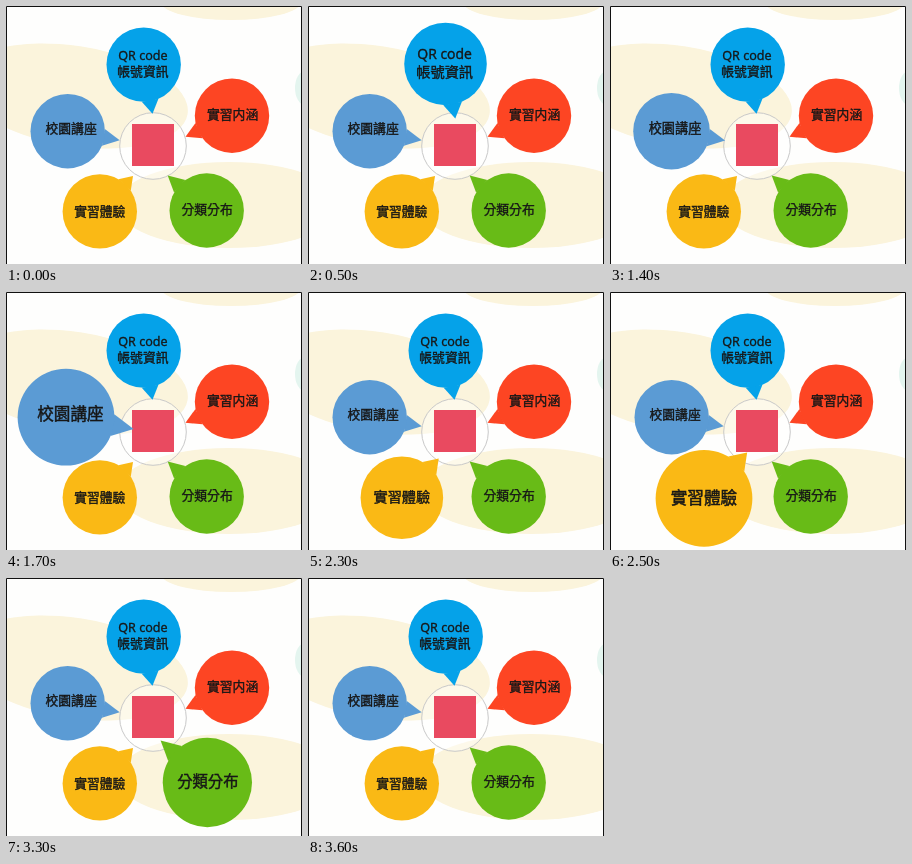
Write an HTML page that moves like this. It is 296 px wide and 258 px high and loops after 4300 ms.

```html
<!DOCTYPE html>
<html lang="zh-Hant">
<head>
<meta charset="utf-8">
<title>實習</title>
<style>
  html, body { margin: 0; width: 100%; height: 100%; overflow: hidden; background: #fff; }
  svg { display: block; width: 100%; height: 100%; }
  text {
    font: 500 12.8px "Noto Sans CJK TC", "Noto Sans CJK", "Noto Sans CJK JP", sans-serif;
    fill: #171717;
    stroke: #171717;
    stroke-width: .35;
    text-anchor: middle;
  }
  .latin { font: 500 12.6px "Open Sans", "Noto Sans", sans-serif; }
</style>
</head>
<body>
<svg id="stage" viewBox="0 0 296 258">
  <rect width="296" height="258" fill="#fefefd"/>
  <g fill="#fbf4dc">
    <ellipse cx="68" cy="90" rx="115" ry="50" transform="rotate(9 68 90)"/>
    <ellipse cx="225" cy="-4" rx="70" ry="18"/>
    <ellipse cx="223" cy="199" rx="112" ry="43"/>
  </g>
  <ellipse cx="299" cy="82" rx="10" ry="17" fill="#e4f5ef"/>
  <circle cx="147" cy="140" r="33.3" fill="#fff" fill-opacity=".4" stroke="#c9c9c9"/>
  <rect x="126" y="118" width="42" height="42" fill="#e94a60"/>
  <g id="bubbles"></g>
  <path d="M.5 258V.5H295.5V258" fill="none" stroke="#111"/>
</svg>
<script>
const LOOP = 4300, STEP = 100, HOLD = 500, R = 37.2;
const GROWTH = [1.03, 1.11, 1.2, 1.3];

// tip and label positions are relative to the bubble centre
const bubbles = [
  { x: 137.7, y: 58.6, tip: [8.8, 49.2], color: '#05a2e9',
    lines: [['QR code', -.8, -4.5, 'latin'], ['帳號資訊', -.8, 11.6]],
    start: 500, skip: 1, shift: [-.5, -1.8] },
  { x: 226, y: 109.7, tip: [-46.5, 21], color: '#fd4523',
    lines: [['實習内涵', .6, 3.3]] },
  { x: 200.7, y: 204.5, tip: [-39, -35], color: '#68bb17',
    lines: [['分類分布', .4, 3.8]],
    start: 3100, skip: 0, shift: [1, 0] },
  { x: 93.8, y: 205.4, tip: [33.2, -35.4], color: '#fab915',
    lines: [['實習體驗', 0, 4.1]],
    start: 2200, skip: 0, shift: [.2, 1] },
  { x: 61.7, y: 125.2, tip: [52, 9], color: '#5b9bd4',
    lines: [['校園講座', 3.4, 2]],
    start: 1400, skip: 0, shift: [-1.7, 0] }
];

function add(parent, name, attrs, text = '') {
  const el = document.createElementNS('http://www.w3.org/2000/svg', name);
  for (const key in attrs) el.setAttribute(key, attrs[key]);
  el.textContent = text;
  return parent.appendChild(el);
}

function tailPath([x, y]) {
  const angle = Math.atan2(y, x);
  const rim = a => `${R * Math.cos(a)} ${R * Math.sin(a)}`;
  return `M${rim(angle - .23)}L${x} ${y}L${rim(angle + .23)}Z`;
}

const layer = document.getElementById('bubbles');
for (const b of bubbles) {
  b.el = add(layer, 'g', {});
  add(b.el, 'path', { d: tailPath(b.tip), fill: b.color });
  add(b.el, 'circle', { r: R, fill: b.color });
  for (const [label, x, y, cls = ''] of b.lines)
    add(b.el, 'text', { x, y, class: cls }, label);
}

function scaleAt({ start, skip }, t) {
  if (start === undefined || t < start || t >= start + HOLD) return 1;
  const step = Math.floor((t - start) / STEP) + skip;
  return GROWTH[Math.min(step, GROWTH.length - 1)];
}

function draw(t) {
  for (const b of bubbles) {
    const s = scaleAt(b, t), grown = (s - 1) / .3;
    const [dx, dy] = b.shift || [0, 0];
    b.el.setAttribute('transform',
      `translate(${b.x + dx * grown} ${b.y + dy * grown}) scale(${s})`);
  }
}

const origin = performance.now();
function tick() {
  draw((performance.now() - origin) % LOOP);
  requestAnimationFrame(tick);
}
tick();
</script>
</body>
</html>
```
